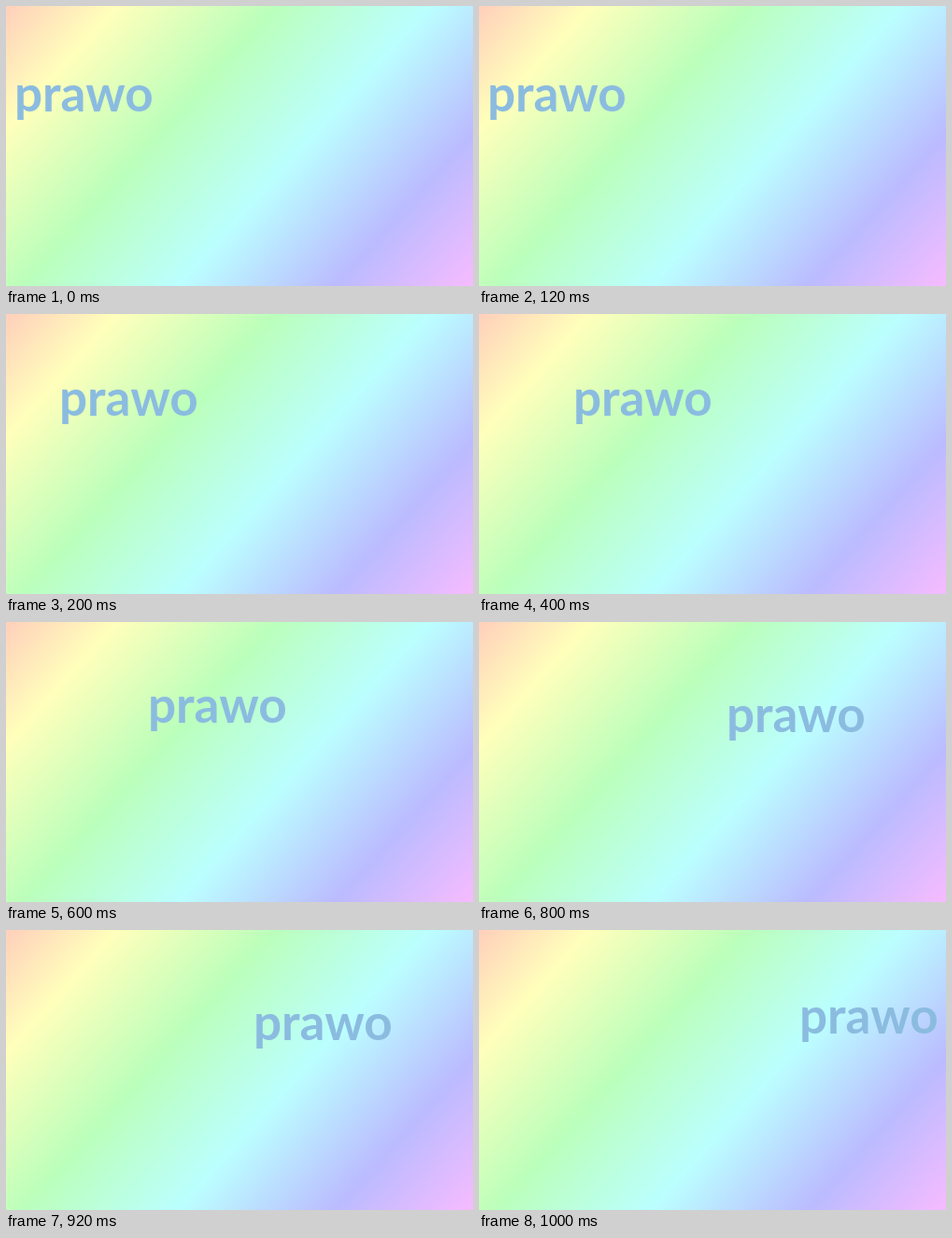
These frames come from a looping animation (500 by 300 pixels, 1200 ms). An HTML page with a canvas:

```html
<!DOCTYPE html>
<html lang="pl">
<head>
<meta charset="utf-8">
<title>prawo</title>
<style>
  html, body { margin: 0; width: 100%; height: 100%; overflow: hidden; }
  canvas { display: block; }
</style>
</head>
<body>
<canvas id="stage" width="500" height="300"></canvas>
<script>
const ctx = document.getElementById('stage').getContext('2d');
const STEP = 200;

// Left edge and lower edge of the word at each step
const poses = [[12, 122], [60, 118], [104, 118], [155, 117], [268, 127], [346, 120]];

// Pastel rainbow running along the direction (1, 0.9)
const slope = 0.9;
const point = t => [t / (1 + slope * slope), t * slope / (1 + slope * slope)];
const sky = ctx.createLinearGradient(...point(-50), ...point(790));
['#ffbbbb', '#ffffbb', '#bbffbb', '#bbffff', '#bbbbff', '#ffbbff']
  .forEach((color, i, all) => sky.addColorStop(i / (all.length - 1), color));

function draw(now) {
  const [left, bottom] = poses[Math.floor(now / STEP) % poses.length];
  ctx.fillStyle = sky;
  ctx.fillRect(0, 0, 500, 300);

  ctx.font = 'bold 53px Lato, Carlito, sans-serif';
  ctx.fillStyle = '#8bbce0';
  const ink = ctx.measureText('prawo');
  ctx.fillText('prawo', left + ink.actualBoundingBoxLeft, bottom - ink.actualBoundingBoxDescent);
}

const start = performance.now();
function tick() {
  draw(performance.now() - start);
  requestAnimationFrame(tick);
}
tick();
</script>
</body>
</html>
```
